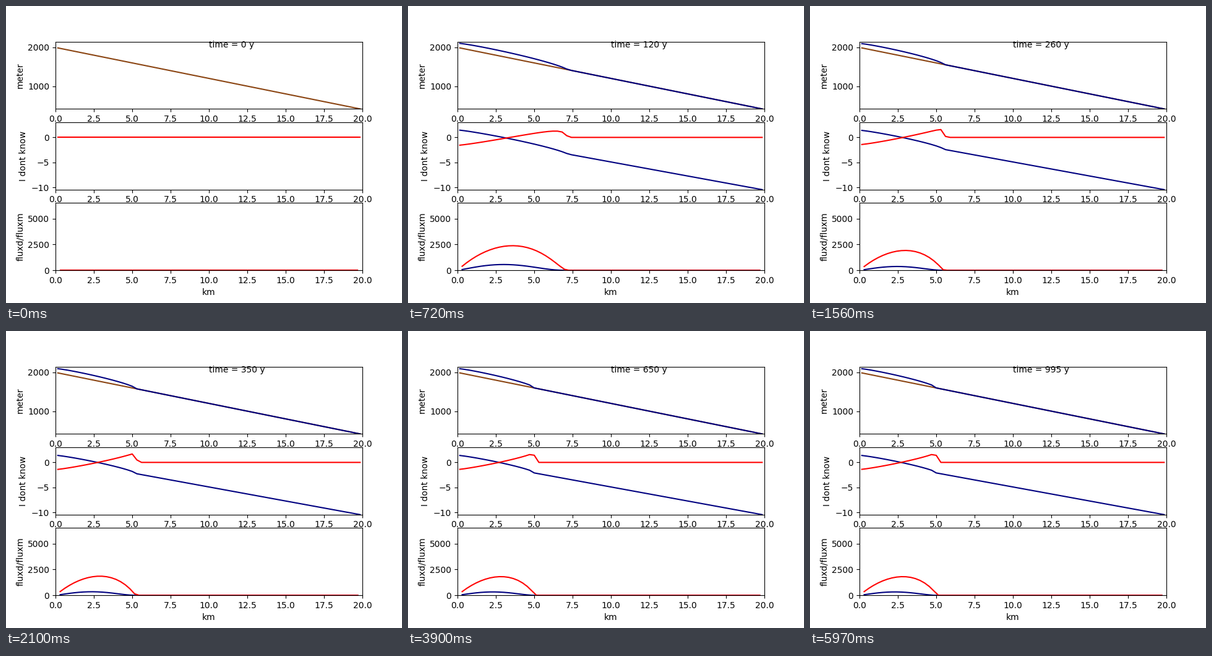
A matplotlib script that plays this animation: 640 by 480 pixels, repeating every 6000 ms.

```python
import numpy as np
import matplotlib.pyplot as plt
from matplotlib.animation import FuncAnimation

# Valley glacier: shallow ice with deformation and sliding, lengths in metres
LENGTH, CELLS = 20000.0, 66
ELA, GRADIENT = 1900.0, 0.007
YEAR = 3.15e7
F_DEFORM, F_SLIDE = 8.0e-25 * YEAR, 6.15e-20 * YEAR
RHO_G = 917 * 9.81
FRAMES, YEARS_PER_FRAME, SUBSTEPS = 200, 5, 200

dx = LENGTH / CELLS
edges = np.arange(1, CELLS) * dx
cells = (np.arange(CELLS) + 0.5) * dx
bed = 2000 - 0.08 * cells


def rates(ice):
    """Surface, mass balance, flux gradient and both fluxes for a thickness."""
    surface = bed + ice
    thick = 0.5 * (ice[1:] + ice[:-1])
    stress = RHO_G * thick * (surface[:-1] - surface[1:]) / dx
    slide = F_SLIDE * stress * stress * stress
    deform = slide * (F_DEFORM / F_SLIDE) * thick * thick
    total = np.zeros(CELLS + 1)
    total[1:-1] = deform + slide
    balance = GRADIENT * (surface - ELA)
    return surface, balance, (total[:-1] - total[1:]) / dx, deform, slide


def simulate():
    dt = YEARS_PER_FRAME / SUBSTEPS
    ice = np.full(CELLS, 200.0)
    blank, still = np.full(CELLS, np.nan), np.zeros(CELLS)
    states = [(blank, blank, still, still[1:], still[1:])]
    for _ in range(FRAMES - 1):
        for _ in range(SUBSTEPS):
            _, balance, supply, _, _ = rates(ice)
            ice = np.maximum(ice + dt * (balance + supply), 0)
        states.append(rates(ice))
    return states


states = simulate()

plt.rcParams["font.family"] = "DejaVu Sans"
fig, (top, mid, low) = plt.subplots(3, 1, figsize=(6.4, 4.8), dpi=100)

for ax, label, limits in (
    (top, "meter", (bed.min(), 2150)),
    (mid, "I dont know", (GRADIENT * (bed.min() - ELA), 3)),
    (low, "fluxd/fluxm", (0, 6500)),
):
    ax.set_xlim(0, 20)
    ax.set_ylim(*limits)
    ax.set_ylabel(label)
low.set_xlabel("km")


def curve(ax, x, color):
    return ax.plot(x / 1000, np.zeros(len(x)), color=color)[0]


top.plot(cells / 1000, bed, color="saddlebrown")
curves = [
    curve(top, cells, "navy"),
    curve(mid, cells, "navy"),
    curve(mid, cells, "red"),
    curve(low, edges, "navy"),
    curve(low, edges, "red"),
]
clock = top.text(10, 2000, "")


def update(i):
    for line, values in zip(curves, states[i]):
        line.set_ydata(values)
    clock.set_text(f"time = {i * YEARS_PER_FRAME} y")
    return [*curves, clock]


anim = FuncAnimation(fig, update, frames=FRAMES, interval=30,
                     repeat=True, repeat_delay=0)
plt.show()
```
